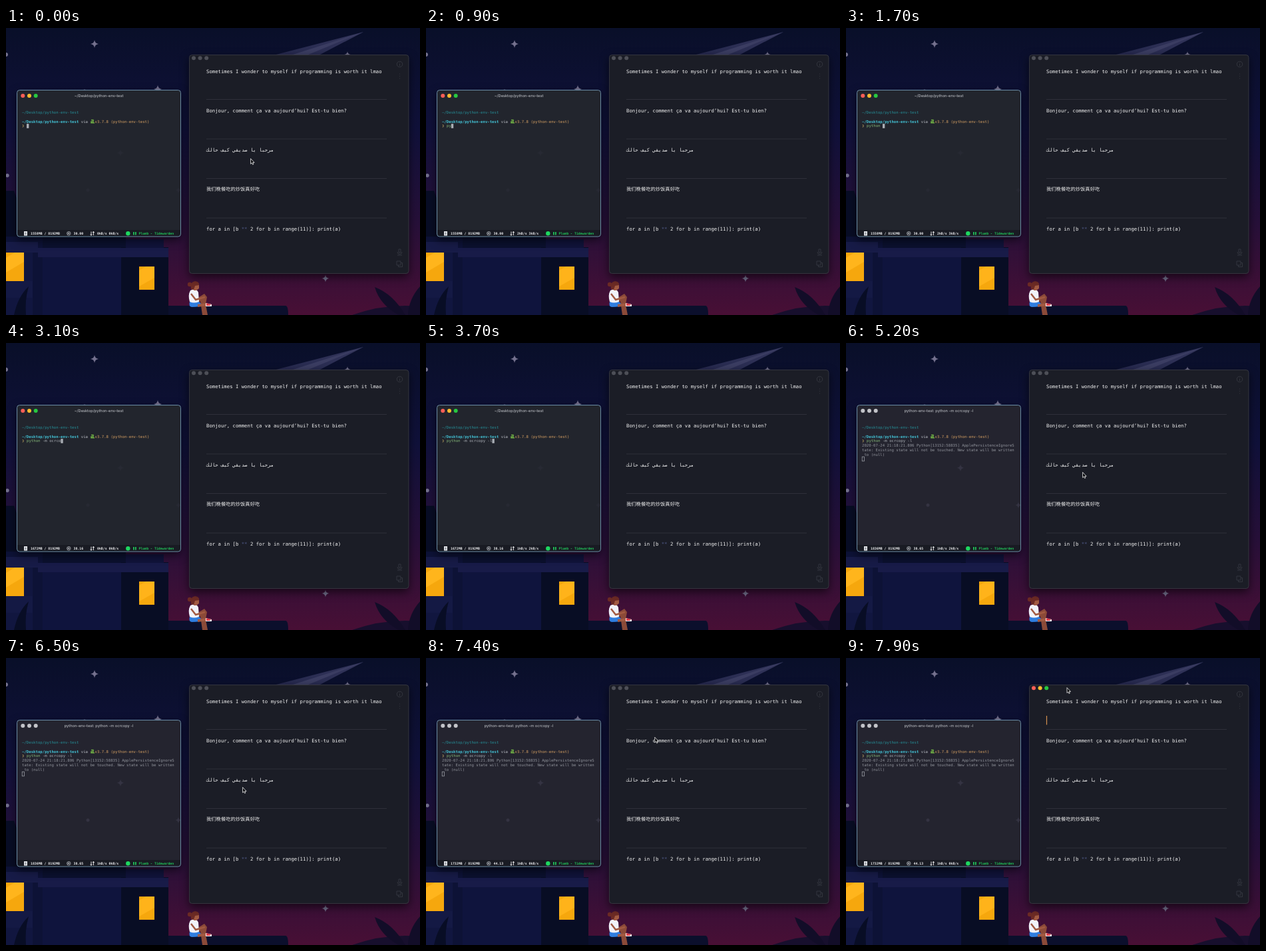
An HTML page for the animation above (8 s loop, 622 by 432 pixels).

```html
<!DOCTYPE html>
<html lang="en">
<head>
<meta charset="utf-8">
<title>Terminal session</title>
<style>
html, body { margin: 0; width: 100%; height: 100%; overflow: hidden; background: #0a0f2b; }
svg { display: block; }
text { white-space: pre; text-rendering: geometricPrecision; font-family: "DejaVu Sans Mono", monospace; }
.term text { font-size: 5.68px; }
.term .title { font: 5.7px Inter, sans-serif; fill: #c9ccd1; text-anchor: middle; }
.status text { font-size: 4.87px; font-weight: bold; fill: #f0f1f3; }
.notes text { font-size: 7.3px; fill: #f0f0f0; }
.notes .cjk { font-family: "Noto Sans CJK SC", "Noto Sans CJK", sans-serif; font-weight: 500; }
.panel { filter: drop-shadow(0 5px 7px #0009); }
.icons { fill: none; stroke: #393b45; stroke-width: .8; }
</style>
</head>
<body>
<svg width="622" height="432" viewBox="0 0 622 432">
  <defs>
    <linearGradient id="sky" x2="0" y2="1">
      <stop stop-color="#090f29"/>
      <stop offset=".35" stop-color="#10113a"/>
      <stop offset=".68" stop-color="#271039"/>
      <stop offset="1" stop-color="#480f35"/>
    </linearGradient>
    <linearGradient id="tail" x1="1" x2="0" y2="1">
      <stop stop-color="#34365c"/>
      <stop offset="1" stop-color="#25284d"/>
    </linearGradient>
    <path id="star" d="M0-6Q.7-.7 6 0Q.7.7 0 6Q-.7.7-6 0Q-.7-.7 0-6Z"/>
  </defs>

  <rect width="622" height="432" fill="url(#sky)"/>
  <path d="M537 6L402 41H470Z" fill="url(#tail)"/>
  <path d="M537 6L428 41H452Z" fill="#3b3d62"/>
  <g id="stars" fill="#74718e">
    <circle cy="40" r="3"/><circle cx="2" cy="222" r="2.7"/><circle cx="206" cy="325" r="2.7"/><circle cx="118" cy="95" r="2.5"/>
  </g>

  <!-- house -->
  <path d="M0 245H12L18 262V300H56V345H0Z" fill="#080d25"/>
  <path d="M0 314H55V432H0Z" fill="#0d1236"/>
  <path d="M0 322H48V338H0Z" fill="#171b47"/>
  <path d="M0 338H40V432H0Z" fill="#11163f"/>
  <path d="M55 312H180V335H55Z" fill="#0b102e"/>
  <path d="M173 330H244V432H173Z" fill="#080d24"/>
  <path d="M55 345H173V432H55Z" fill="#0f143d"/>
  <path d="M48 331H244V345H48Z" fill="#181b48"/>
  <path d="M180 318H237V331H180Z" fill="#10133a"/>
  <path d="M0 338H27V381H0Z" fill="#f6a70d"/>
  <path d="M0 346L13 338H27V352L0 368Z" fill="#ffb51c"/>
  <path d="M200 359H223V394H200Z" fill="#f6a70d"/>
  <path d="M200 365L210 359H223V376L200 389Z" fill="#ffb31a"/>
  <path d="M0 381H40V406H0Z" fill="#141944"/>
  <path d="M12 432Q18 404 34 389Q28 410 30 432Z" fill="#080d25"/>
  <path d="M244 418H420Q424 418 424 432H244Z" fill="#0b0f2c"/>
  <path d="M520 432Q570 414 622 419V432Z" fill="#170f2d"/>
  <path d="M590 432Q562 417 554 390Q581 400 600 432ZM604 432Q605 408 622 389V432Z" fill="#120d28"/>

  <!-- seated figure -->
  <path d="M290 405L298 400L302 405L300 416L303 432H295L292 411L281 419Z" fill="#8b4a38"/>
  <path d="M276 412H290L295 417Q292 420 279 420Q274 419 276 412Z" fill="#2f7de0"/>
  <path d="M277 395Q286 391 289 398L290 412Q282 415 276 412Q273 402 277 395Z" fill="#f1f2fa"/>
  <path d="M278 400L285 409L299 405" fill="none" stroke="#a25a42" stroke-width="2.5"/>
  <path d="M282 386H290V392L286 395H282Z" fill="#a25a42"/>
  <path d="M278 393Q276 382 284 381Q291 382 290 387L284 388L282 394Z" fill="#6d2b25"/>
  <circle cx="276" cy="386" r="3.2" fill="#6d2b25"/>
  <path d="M288 418L302 416" stroke="#a25a42" stroke-width="4"/>
  <path d="M300 414L309 416V419H300Z" fill="#f4eef2"/>
  <path d="M301 414L308 416L306 418H301Z" fill="#e0414c"/>

  <g class="term">
    <rect id="termPanel" class="panel" x="16.5" y="93.5" width="246" height="220.5" rx="4"/>
    <g id="ghostStars" fill="#74718e"></g>
    <path d="M17 304H262V310Q262 314 258 314H21Q17 314 17 310Z" fill="#191b23"/>
    <rect x="16.5" y="93.5" width="246" height="220.5" rx="4" fill="none" stroke="#7399b3" stroke-width=".9"/>
    <g id="termLights"></g>
    <text id="title" class="title" x="139.5" y="104.1"></text>
    <text x="24" y="129.2" fill="#268f98">~/Desktop/python-env-test</text>
    <text x="24" y="142.7" fill="#b7bbc2"><tspan fill="#43c1d4" font-weight="bold">~/Desktop/python-env-test</tspan> via</text>
    <path d="M128 138.5H131V141H128V142.7H133" fill="none" stroke="#6fae45" stroke-width="1.5"/>
    <text x="133.5" y="142.7" fill="#d6a063">v3.7.8 (python-env-test)</text>
    <text x="24" y="149.4" fill="#c3a763">❯</text>
    <text x="31" y="149.4" fill="#aeb2b9"><tspan id="command" fill="#85b878"></tspan><tspan id="args"></tspan></text>
    <g id="log" fill="#91949c">
      <text x="24" y="156.2">2020-07-24 21:18:21.806 Python[13152:58835] ApplePersistenceIgnoreS</text>
      <text x="24" y="162.9">tate: Existing state will not be touched. New state will be written</text>
      <text x="24" y="169.7"> to (null)</text>
    </g>
    <rect id="cursor" width="3.4" height="6.6"/>
    <g class="status">
      <path d="M27 306H32V312.5H27Z" fill="#e4e6ea"/>
      <path d="M28.5 307.5H30.5V311H28.5Z" fill="#8b8e96"/>
      <circle cx="94.3" cy="309.2" r="2.5" fill="none" stroke="#a3a7ae" stroke-width="1.5" stroke-dasharray="1.2 .5"/>
      <circle cx="94.3" cy="309.2" r="1" fill="#d7d9dd"/>
      <path d="M128 306.5V312M126.6 310.6L128 312.2L129.4 310.6M131.4 312V306.5M130 308L131.4 306.4L132.8 308" fill="none" stroke="#fff" stroke-width=".9"/>
      <text id="memory" x="37" y="311"></text>
      <text id="cpu" x="101.5" y="311"></text>
      <text id="network" x="137" y="311"></text>
      <circle cx="183.3" cy="309.2" r="3.2" fill="#1ed760"/>
      <path d="M191 307H192.7V311.5H191ZM194 307H195.7V311.5H194Z" fill="#22c55a"/>
      <text x="199.5" y="311" style="fill:#22c55a">Plumb - Tidewarden</text>
    </g>
  </g>

  <g class="notes">
    <rect class="panel" x="275.5" y="40.5" width="329.5" height="329" rx="4" fill="#1b1d26" stroke="#3b3d46" stroke-width=".8"/>
    <g id="noteLights"></g>
    <path d="M301 107.5H572M301 167H572M301 226.5H572M301 286H572" stroke="#30323c" stroke-width=".9"/>
    <text x="301" y="67.6">Sometimes I wonder to myself if programming is worth it lmao</text>
    <text x="301" y="127">Bonjour, comment ça va aujourd’hui? Est-tu bien?</text>
    <text x="301" y="186">مرحبا يا صديقي كيف حالك</text>
    <text x="301" y="245.4" class="cjk">我们晚餐吃的炒饭真好吃</text>
    <text x="301" y="304.8">for a in [b <tspan fill="#505b88">**</tspan> 2 for b in range(11)]: print(a)</text>
    <path id="caret" d="M301.5 87V100.5" stroke="#d6924f" stroke-width="1.2"/>
    <g class="icons">
      <circle cx="591.5" cy="54.5" r="4.2"/>
      <path d="M591.5 52V52.8M591.5 54V57M591.5 68.6V69.6M591.5 72V73M591.5 75.4V76.4"/>
      <path d="M590 333H593V338H590ZM588 337Q588 340.5 591.5 340.5T595 337M588 342H595"/>
      <path d="M587 351H593V357H587ZM589.5 357V359.5H595.5V353.5H593"/>
    </g>
  </g>

  <path id="pointer" d="M0 0V8L1.8 6.4L3 9L4.3 8.4L3.2 5.9H5.5Z" fill="#08090c" stroke="#f3f3f3" stroke-width=".8"/>
</svg>

<script>
const LOOP = 8000, CELL = 3.42;
const $ = id => document.getElementById(id);

const COMMAND = 'python -m ocrcopy -l';
const KEY_TIMES = [800, 900, 1000, 1200, 1300, 1500, 1600, 1900, 2000, 2200,
  2300, 2500, 2700, 2900, 3000, 3200, 3300, 3400, 3500, 3600];
const MEMORY = [[0, 1558], [2300, 1672], [5000, 1836], [7100, 1732]];
const CPU = [[0, '30.00'], [2300, '38.16'], [4300, '38.65'], [7300, '44.13']];
const NETWORK = [[0, [0, 0]], [200, [2, 3]], [1900, [0, 0]], [3600, [1, 2]], [5400, [1, 0]]];
const POINTER = [[0, 367.6, 196.6], [4700, 367.6, 196.6], [4900, 355.6, 194.6],
  [7100, 355.6, 194.6], [7700, 332, 44.6]];
const ENTER = 4100, LOGGED = 5000, BLUR = 5200, FOCUS = 7700;

const LIT = ['#ff5f57', '#febc2e', '#28c840'];

const stars = list => list.map(([x, y, s = 1]) =>
  `<use href="#star" transform="translate(${x} ${y}) scale(${s})"/>`).join('');
$('stars').innerHTML += stars([[133, 24], [228, 92], [513, 40, .8], [480, 377, .9]]);
$('ghostStars').innerHTML = stars([[172, 188, .9], [259, 244, .8]]) + '<circle cx="123" cy="244" r="2.5"/>';

const addLights = (id, x, y, gap) => {
  $(id).innerHTML = LIT.map((_, i) => `<circle cx="${x + i * gap}" cy="${y}" r="3"/>`).join('');
};
addLights('termLights', 25.3, 102, 9.7);
addLights('noteLights', 282, 45.2, 9.6);

const set = (id, attrs) => {
  for (const name in attrs) $(id).setAttribute(name, attrs[name]);
};
const write = (id, value) => {
  if ($(id).textContent !== value) $(id).textContent = value;
};
const show = (id, visible) => set(id, { visibility: visible ? 'visible' : 'hidden' });
const valueAt = (track, t) => track.findLast(([time]) => time <= t)[1];
const paintLights = (id, lit, dim) =>
  [...$(id).children].forEach((dot, i) => dot.setAttribute('fill', lit ? LIT[i] : dim));

function pointerAt(t) {
  const i = POINTER.findLastIndex(([time]) => time <= t);
  const [t0, x0, y0] = POINTER[i], [t1, x1, y1] = POINTER[i + 1] || [LOOP, x0, y0];
  const u = (t - t0) / (t1 - t0), k = u * u * (3 - 2 * u);
  return [x0 + (x1 - x0) * k, y0 + (y1 - y0) * k];
}

function render(t) {
  const typed = KEY_TIMES.filter(time => time <= t).length;
  const active = t < BLUR;

  write('command', COMMAND.slice(0, Math.min(typed, 6)));
  write('args', COMMAND.slice(6, Math.max(typed, 6)));
  write('title', t < ENTER ? '~/Desktop/python-env-test' : 'python-env-test: python -m ocrcopy -l');
  show('log', t >= LOGGED);

  const row = t < ENTER ? 0 : t < LOGGED ? 1 : 4;
  set('cursor', {
    x: row ? 24.2 : 31 + typed * CELL,
    y: 144.2 + row * 6.75,
    fill: active ? '#a9adb4' : 'none',
    stroke: active ? 'none' : '#a9adb4',
    'stroke-width': .7
  });

  set('termPanel', { fill: active ? '#22252d' : '#24242f' });
  set('ghostStars', { opacity: active ? .06 : .2 });
  paintLights('termLights', active, '#c3c4c9');

  write('memory', valueAt(MEMORY, t) + 'MB / 8192MB');
  write('cpu', valueAt(CPU, t));
  write('network', valueAt(NETWORK, t).map(n => n + 'kB/s').join(' '));

  paintLights('noteLights', t >= FOCUS, '#4d4f57');
  show('caret', t >= FOCUS);
  show('pointer', t < KEY_TIMES[0] || t >= 4700);
  set('pointer', { transform: `translate(${pointerAt(t)})` });
}

function tick() {
  render(performance.now() % LOOP);
  requestAnimationFrame(tick);
}
tick();
</script>
</body>
</html>
```
